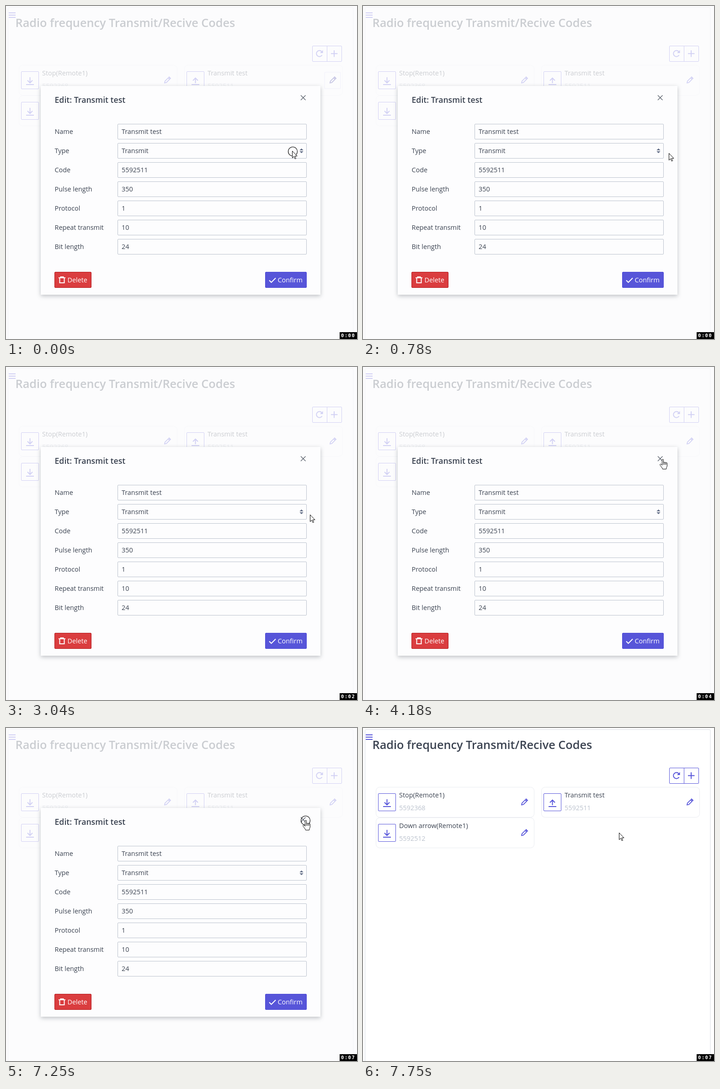
Write an HTML page that moves like this. It is 768 px wide and 729 px high and loops after 8 s.

```html
<!DOCTYPE html>
<html lang="en">
<head>
<meta charset="utf-8">
<title>Radio codes</title>
<style>
  html, body { margin: 0; width: 100%; height: 100%; overflow: hidden; background: #fff; }
  svg { display: block; }
  text { font: 14.4px "Open Sans", "Noto Sans", sans-serif; fill: #3b4351; white-space: pre; }
  .title { font-size: 25.25px; font-weight: 600; }
  .head { font-size: 17.7px; font-weight: 600; }
  .dim { fill: #bcc3ce; }
  .light { fill: #fff; }
  .clock { font: bold 10.5px "DejaVu Sans Mono", monospace; fill: #fff; }
  .line { fill: none; stroke: #5755d9; }
  .bold { fill: none; stroke: #5755d9; stroke-width: 2; }
  .white { fill: none; stroke: #fff; stroke-width: 2; }
  .card { fill: none; stroke: #eaecf1; }
  .field { fill: none; stroke: #bcc3ce; }
  .pointer { fill: #fff; stroke: #000; stroke-linejoin: round; }
  .ring { fill: none; stroke: #111; stroke-width: 1.2; }
</style>
</head>
<body>
<svg id="stage" width="768" height="729" viewBox="0 0 768 729"></svg>
<script>
const LOOP = 8000;
const stage = document.getElementById('stage');

const text = (x, y, s, cls = '') => `<text x="${x}" y="${y}" class="${cls}">${s}</text>`;
const path = (d, cls, more = '') => `<path d="${d}" class="${cls}" ${more}/>`;
const rect = (x, y, w, h, cls, more = '') =>
  `<rect x="${x}" y="${y}" width="${w}" height="${h}" class="${cls}" ${more}/>`;
const at = (x, y, s) => `<g transform="translate(${x} ${y})">${s}</g>`;

const pencil = (x, y, color = '#5755d9') => at(x, y,
  `<g transform="rotate(45)" fill="none" stroke="${color}" stroke-width="1.8">
   <path d="M-2.2-5.2H2.2V4.6L0 8-2.2 4.6Z"/><path d="M-3.1-7.8H3.1" stroke-width="2.6"/></g>`);

const card = (x, y, name, code, up) => at(x, y,
  rect(.5, .5, 346, 66, 'card', 'rx="8"') +
  rect(5.5, 14.5, 38, 38, 'line', 'rx="1.5"') +
  path(up ? 'M24.5 40V29M19 34.2l5.5-5.5 5.5 5.5M16 43H33'
          : 'M24.5 27V39M19 33.8l5.5 5.5 5.5-5.5M16 43H33', 'bold') +
  text(51, 23, name) + text(51, 50.5, code, 'dim') + pencil(324.7, 33.7));

const page =
  rect(4.5, 3.5, 755.5, 740, 'line', 'rx="2" style="stroke:#dadee4"') +
  path('M6 15H21M6 20H21M6 25H21', 'bold') +
  text(20.5, 45.5, 'Radio frequency Transmit/Recive Codes', 'title') +
  rect(670.5, 87.5, 64, 34, 'line', 'rx="1.5"') + path('M702.5 87V122', 'line') +
  path('M691.5 107.5A6.6 6.6 0 1 1 690.6 99.6', 'bold') +
  path('M693.5 96.5V103H687Z', '', 'fill="#5755d9"') +
  path('M718 97V111.5M711 104.2H725.5', 'bold') +
  card(28, 129, 'Stop(Remote1)', '5592368') +
  card(390, 129, 'Transmit test', '5592511', true) +
  card(28, 196, 'Down arrow(Remote1)', '5592512');

const fields = [
  ['Name', 'Transmit test'], ['Type', 'Transmit'], ['Code', '5592511'],
  ['Pulse length', '350'], ['Protocol', '1'], ['Repeat transmit', '10'], ['Bit length', '24']
].map(([label, value], i) => at(0, i * 42,
  text(106.5, 280, label) +
  rect(244.5, 258.5, 413, 33, 'field', 'rx="1.5"') +
  text(253, 280, value))).join('');

const dropdown =
  rect(244.5, 300.5, 413, 33, 'line', 'rx="1.5" style="stroke-width:4;stroke-opacity:.2"') +
  rect(244.5, 300.5, 413, 33, 'line', 'rx="1.5"') +
  rect(244.5, 334, 413, 43.5, '', 'fill="#fff" stroke="#6a84b8"') +
  rect(245, 334.5, 412, 21.5, '', 'fill="#1e90ff"') +
  text(253, 351, 'Transmit', 'light') + text(253, 372, 'Recive');

const modal =
  rect(0, 0, 768, 729, '', 'fill="#fbfbfc" opacity=".75"') +
  rect(76, 175, 612, 457, '', 'fill="#fdfdfe" style="filter:drop-shadow(0 3.8px 4.75px rgba(48,55,66,.3))"') +
  text(106.5, 212, 'Edit: Transmit test', 'head') +
  path('M645 195.5l10.5 10.5M655.5 195.5l-10.5 10.5', '', 'stroke="#59606c" stroke-width="1.3"') +
  fields +
  path('M642.5 316L646.5 312 650.5 316ZM642.5 318L646.5 322 650.5 318Z', '', 'fill="#667189"') +
  rect(106.5, 582.5, 80, 34, '', 'rx="1.5" fill="#da3d3f" stroke="#b3161a"') +
  path('M115 595H130M119.5 594V593H125.5V594M117.5 595V606H127.5V595', 'white') +
  text(134.5, 605, 'Delete', 'light') +
  rect(567.5, 582.5, 90, 34, '', 'rx="1.5" fill="#5755d9" stroke="#4b48d6"') +
  path('M576 600.5L580.5 605 590 595.5', 'white') +
  text(594.5, 605, 'Confirm', 'light') +
  `<g id="dropdown">${dropdown}</g>` +
  path('M642.5 316L646.5 312 650.5 316ZM642.5 318L646.5 322 650.5 318Z', '', 'fill="#667189"');

const ring = (id, x, y) => `<circle id="${id}" cx="${x}" cy="${y}" r="10" class="ring"/>`;

const ticks = [0, 880, 2010, 3140, 4180, 5200, 6230, 7000];

stage.innerHTML = page +
  `<g id="hover">${rect(697, 145, 35, 36, 'line', 'rx="2" stroke-opacity=".3"')}${pencil(714.7, 162.7, '#38379a')}</g>` +
  `<g id="modal">${modal}</g>` +
  ring('ringType', 627.5, 318.5) + ring('ringClose', 655.5, 202.5) +
  `<g id="arrow">${path('M.5.5V15.6L4 12.3 6.3 17.7 8.5 16.8 6.2 11.5H11Z', 'pointer')}</g>` +
  `<g id="beam">${path('M0 .5H2.5L3.5 1.5 4.5.5H7M3.5 1.5V19.5M0 20.5H2.5L3.5 19.5 4.5 20.5H7', '', 'fill="none" stroke="#000"')}</g>` +
  `<g id="hand">${path('M5.5 14V2.5a1.5 1.5 0 0 1 3 0V8.5a1.4 1.4 0 0 1 2.7 0a1.4 1.4 0 0 1 2.7.6a1.3 1.3 0 0 1 2.5 1V15c0 3-1.9 3.8-1.9 7.5H6.5C6.3 19.5 2.2 16.5.8 13.3c-.6-1.7 1.3-2.5 2.5-1.3ZM8.5 8.5V13M11.2 8.5V13M13.9 9.1V13', 'pointer')}</g>` +
  rect(730, 714, 38, 15, '', 'fill="#000"') +
  text(733, 724.5, '0', 'clock') + text(741, 724.5, ':', 'clock') + text(748.5, 724.5, '0', 'clock') +
  ticks.map((t, i) => `<text id="tick${i}" x="756.5" y="724.5" class="clock">${i}</text>`).join('');

// Each row is [time, value]; a value holds until the next row.
function hold(id, prop, rows) {
  const frames = rows.map(([t, v]) => ({ offset: t / LOOP, [prop]: v, easing: 'step-end' }));
  frames.push({ offset: 1, [prop]: rows[rows.length - 1][1] });
  document.getElementById(id).animate(frames, { duration: LOOP, iterations: Infinity });
}

function show(id, ...spans) {
  const rows = spans[0][0] > 0 ? [[0, 0]] : [];
  for (const [from, to] of spans) {
    rows.push([from, 1]);
    if (to < LOOP) rows.push([to, 0]);
  }
  hold(id, 'opacity', rows);
}

const move = (id, rows) =>
  hold(id, 'transform', rows.map(([t, x, y]) => [t, `translate(${x}px, ${y}px)`]));

show('hover', [0, 250]);
show('ringType', [0, 250]);
show('dropdown', [250, 780]);
show('ringClose', [7250, 7500]);
show('modal', [0, 7500]);
show('arrow', [0, 1660], [1910, 3660], [7500, LOOP]);
show('beam', [1660, 1910]);
show('hand', [3660, 7500]);
ticks.forEach((t, i) => show('tick' + i, [t, ticks[i + 1] || LOOP]));

move('arrow', [
  [0, 626, 317], [500, 669, 322], [1130, 674, 355], [1400, 674, 439],
  [1910, 541, 582], [2260, 534, 592], [2510, 543, 601],
  [3040, 665, 323], [3410, 659, 218], [7500, 655, 201], [7750, 560, 229]
]);
move('beam', [[0, 635, 517]]);
move('hand', [[0, 652, 202], [3910, 649, 201]]);
</script>
</body>
</html>
```
